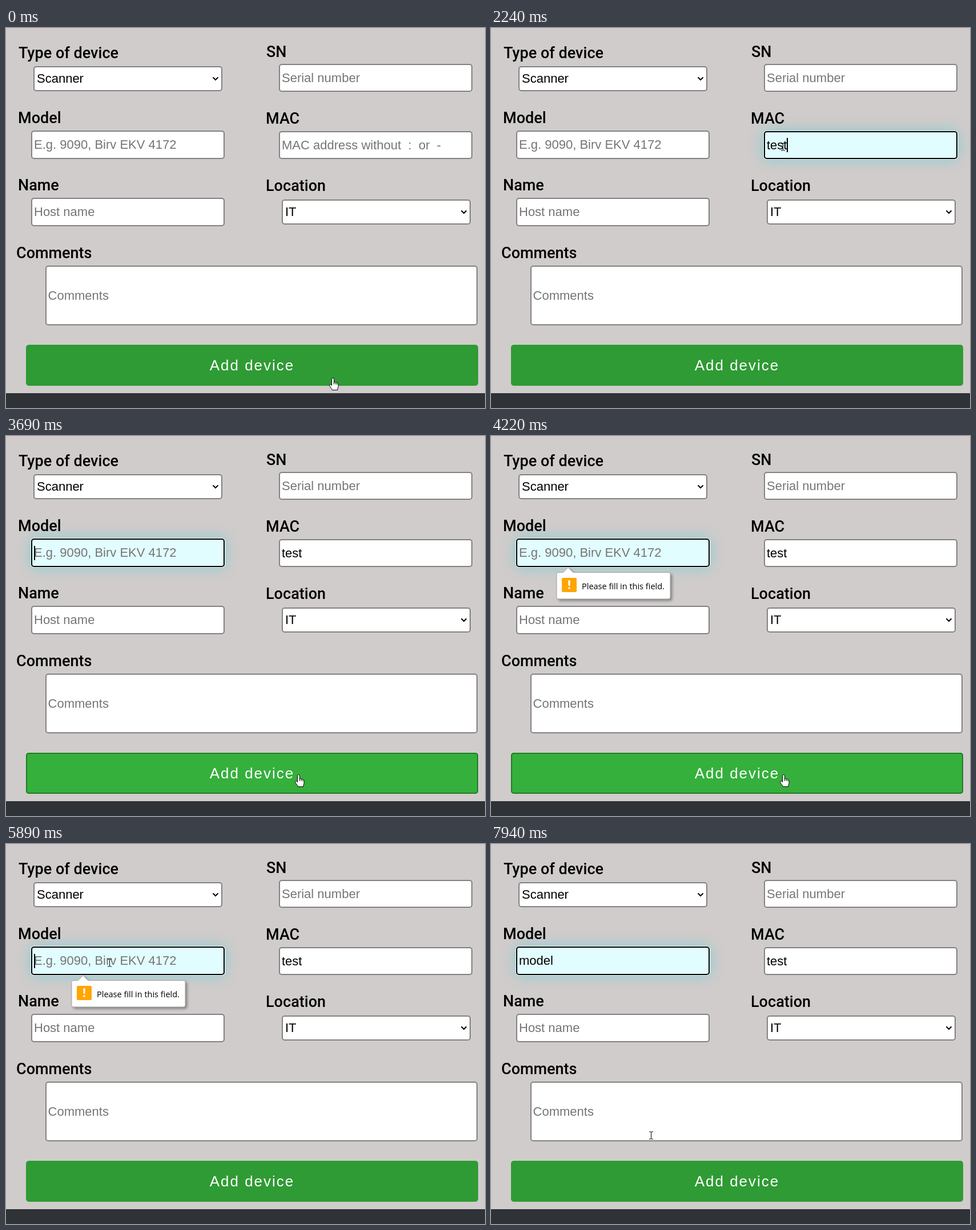
An HTML page for the animation above (7990 ms loop, 839 by 667 pixels).

```html
<!DOCTYPE html>
<html lang="en">
<head>
<meta charset="utf-8">
<title>Add device form</title>
<style>
html, body { margin: 0; width: 100%; height: 100%; overflow: hidden; background: #d0cccb; }
body { position: relative; font: 22px "Liberation Sans", Arial, sans-serif; color: #000; cursor: none; }
div, svg { position: absolute; box-sizing: border-box; white-space: pre; }
.label { font: 500 27px/40px Roboto, sans-serif; }
.field { display: flex; align-items: center; padding-left: 3px; background: #fff; border: 2px solid #838181; border-radius: 5px; }
.select { padding-left: 4px; }
.field span, .field i, .button span { position: relative; }
.hint { color: #757575; }
.caret { width: 1.5px; height: 25px; margin-right: -1.5px; background: #000; }
.field::before, .button::before { content: ""; position: absolute; border-radius: 5px; opacity: var(--lit, 0); }
.field::before { inset: -2px; background: #e2fdff; border: 2px solid #000; box-shadow: 0 0 0 1px #e8f6f7, 0 0 24px rgba(110, 205, 212, .8); }
.button { display: flex; align-items: center; justify-content: center; background: #2f9b34; border-radius: 5px; color: #fff; font-size: 26px; letter-spacing: 2px; }
.button::before { inset: 0; background: #35b03c; border: 2px solid #217c27; }
.footer { left: 0; top: 641px; width: 100%; height: 26px; background: #2f3236; }
#tip { left: 0; top: 0; filter: drop-shadow(3px 3px 2px rgba(0, 0, 0, .35)); }
#tip text { font: 14.5px "Open Sans", "Noto Sans", sans-serif; }
#cursor { left: 0; top: 0; overflow: visible; }
</style>
</head>
<body>
<div class="footer"></div>
<script>
const LOOP = 7990, BLINK = 535;

function add(className, [left, top, right, bottom], html) {
  const el = document.createElement("div");
  el.className = className;
  el.style.cssText = `left:${left}px;top:${top}px;` +
    (right ? `width:${right - left}px;height:${bottom - top}px` : "");
  el.innerHTML = html;
  document.body.append(el);
  return el;
}

const hint = text => `<span class="hint">${text}</span>`;
const chevron = '<svg style="right:4px" width="12" height="8"><path d="M1.5 1.5 6 6l4.5-4.5" fill="none" stroke="#000" stroke-width="2"/></svg>';
const boxes = {
  serial: [478, 63, 817, 112],
  model: [44, 180, 383, 230],
  mac: [478, 181, 817, 230],
  name: [44, 298, 383, 348],
  comments: [68.6, 417, 826, 522],
  button: [35, 556, 827, 628]
};
const hints = {
  serial: "Serial number",
  model: "E.g. 9090, Birv EKV 4172",
  mac: "MAC address without  :  or  -",
  name: "Host name",
  comments: "Comments"
};
const fields = {};
for (const id in hints) fields[id] = add("field", boxes[id], hint(hints[id]));
add("field select", [48, 67, 379, 111], "<span>Scanner</span>" + chevron);
add("field select", [483, 301, 814, 345], "<span>IT</span>" + chevron);
const button = add("button", boxes.button, "<span>Add device</span>");

[["Type of device", 22, 24], ["SN", 456, 22], ["Model", 21, 138], ["MAC", 455, 139],
 ["Name", 21, 256], ["Location", 455, 257], ["Comments", 18, 375]]
  .forEach(([text, x, y]) => add("label", [x, y], text));
</script>

<svg id="tip" width="330" height="300">
  <path d="M118 239.500H126L135 231l9 8.500H311a3 3 0 0 1 3 3V283a3 3 0 0 1-3 3H118a3 3 0 0 1-3-3V242.500a3 3 0 0 1 3-3z" fill="#fff" stroke="#a5a3a2"/>
  <rect x="124" y="249" width="26" height="25" rx="2" fill="#ffa500"/>
  <path d="M135.200 253.500h3.600l-.5 9.500h-2.600zM135.400 265.500h3.200v3h-3.200z" fill="#fff"/>
  <text x="159" y="268.500">Please fill in this field.</text>
</svg>
<svg id="cursor" width="1" height="1" stroke="#000">
  <path data-kind="arrow" d="M0 0V15.500L3.600 12.200 6 18 8.500 17 6.100 11.400H11Z" fill="#fff"/>
  <g data-kind="hand">
    <path d="M-2 2a2 2 0 0 1 4 0v5.500c.8-.8 2.600-.6 2.800.5.8-.6 2.400-.3 2.500.8.900-.5 2.200 0 2.200 1.300V15c0 2-1.500 3.500-1.500 6H-1c-.5-2.500-4.500-5.500-5-8.500 0-1.800 2.200-1.800 4 .5z" fill="#fff"/>
    <path d="M2 7v4M4.800 8v3M7.300 9v2.500" fill="none"/>
  </g>
  <path data-kind="text" d="M-3.500-6.500h2.500l1 1 1-1h2.500M-3.500 6.500h2.500l1-1 1 1h2.500M0-6V6" fill="none"/>
</svg>

<script>
// Each move: start, end, x, y, easing.
const linear = k => k;
const smooth = k => k * k * (3 - 2 * k);
const easeOut = k => 1 - (1 - k) ** 2;
const moves = [
  [30, 820, 511, 208, smooth],
  [2700, 3280, 512, 594, smooth],
  [4280, 4560, 469, 528, linear],
  [4560, 4870, 256, 292, easeOut],
  [5050, 5290, 187, 193, smooth],
  [5510, 5710, 181, 199, smooth],
  [5860, 5890, 181, 208, linear],
  [7500, 7940, 280, 511, smooth]
];
const typing = {
  mac: { word: "test", focus: 965, blur: 3480, keys: [1610, 1760, 2090, 2240] },
  model: { word: "model", focus: 3495, blur: LOOP, keys: [6250, 6430, 6640, 6870, 6970] }
};
const tip = document.getElementById("tip");
const cursor = document.getElementById("cursor");

const ramp = (t, from, to) => Math.min(1, Math.max(0, (t - from) / (to - from)));
const inside = (x, y, [left, top, right, bottom]) => x >= left && x < right && y >= top && y < bottom;

function drawCursor(t) {
  let x = 572, y = 614;
  for (const [from, to, endX, endY, ease] of moves) {
    const k = ease(ramp(t, from, to));
    x += (endX - x) * k;
    y += (endY - y) * k;
  }
  const over = Object.keys(boxes).find(id => inside(x, y, boxes[id]));
  const kind = over === "button" ? "hand" : over ? "text" : "arrow";
  for (const shape of cursor.children) shape.style.display = shape.dataset.kind === kind ? "" : "none";
  cursor.style.transform = `translate(${Math.round(x) + .5}px, ${Math.round(y) + .5}px)`;
}

function drawField(id, t) {
  const { word, focus, blur, keys } = typing[id];
  const count = keys.filter(key => t >= key).length;
  const since = t - (count ? keys[count - 1] : focus);
  const caret = t >= focus && t < blur && since % (2 * BLINK) < BLINK;
  const html = `<span>${word.slice(0, count)}</span>` + (caret ? '<i class="caret"></i>' : "") +
    (count ? "" : hint(hints[id]));
  const field = fields[id];
  if (field.shown !== html) field.innerHTML = field.shown = html;
  field.style.setProperty("--lit", ramp(t, focus, focus + 110) - (blur < LOOP ? ramp(t, blur, blur + 180) : 0));
}

function draw() {
  const t = performance.now() % LOOP;
  drawField("mac", t);
  drawField("model", t);
  button.style.setProperty("--lit", ramp(t, 0, 120) - ramp(t, 215, 335) + ramp(t, 3164, 3284) - ramp(t, 4439, 4559));
  tip.style.opacity = ramp(t, 3810, 4200) - ramp(t, 6250, 6420);
  drawCursor(t);
  requestAnimationFrame(draw);
}
draw();
</script>
</body>
</html>
```
